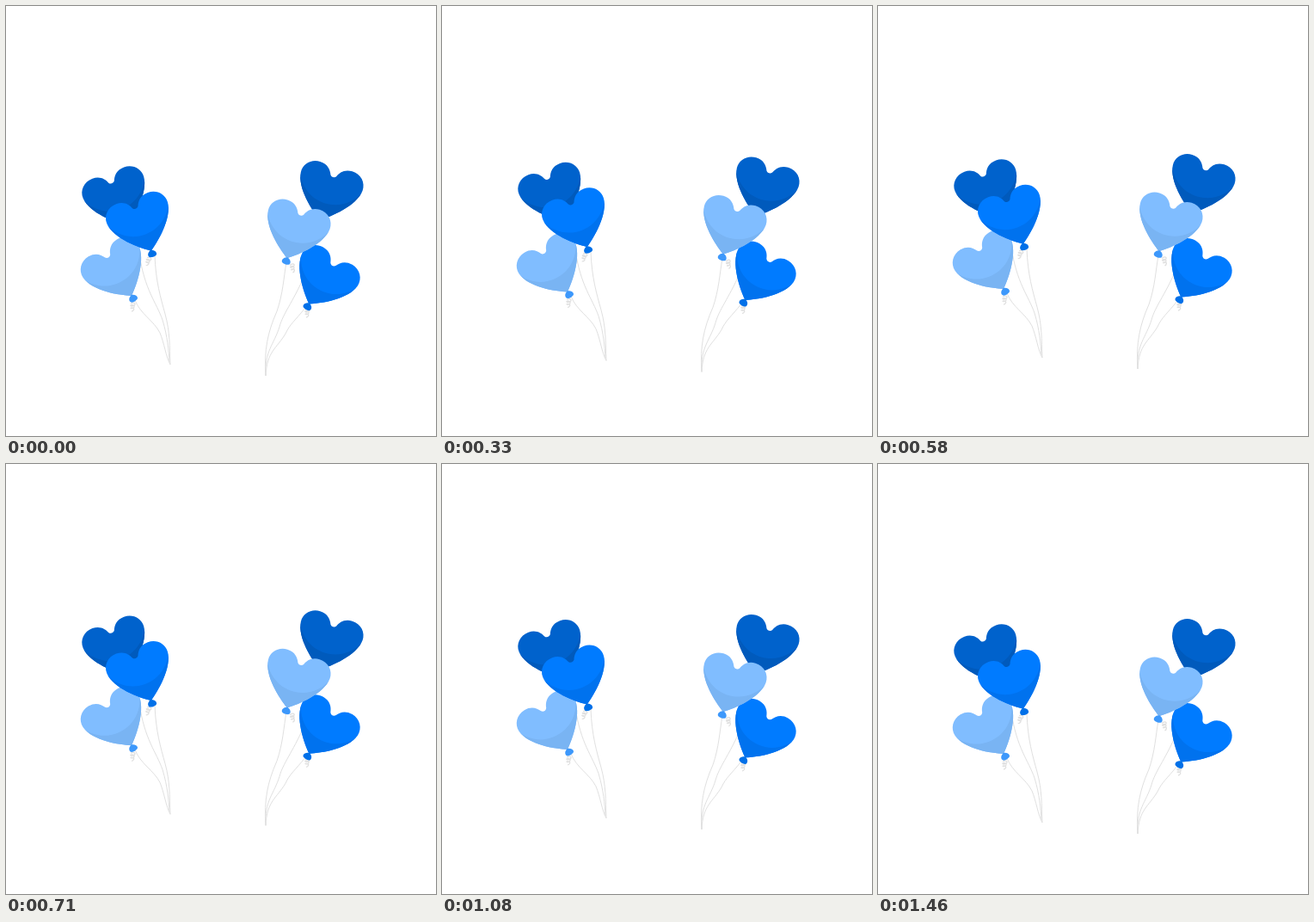
Write an HTML page with a canvas that moves like this. It is 500 px wide and 500 px high and loops after 1.5 s.

```html
<!DOCTYPE html>
<html lang="en">
<head>
<meta charset="utf-8">
<title>Heart balloons</title>
<style>
  html, body { margin: 0; width: 100%; height: 100%; overflow: hidden; background: #fff; }
  canvas { display: block; width: 100vw; height: 100vh; }
</style>
</head>
<body>
<canvas id="stage" width="500" height="500"></canvas>
<script>
const ctx = document.getElementById('stage').getContext('2d');

const LOOP = 1500;
const FPS = 24;
const LAST_STEP = 35;
const RISE = 10;

const DARK = { body: '#0062cc', shade: '#005abc' };
const MID = { body: '#007bff', shade: '#0072ee', knot: '#0070e8' };
const LIGHT = { body: '#80bdff', shade: '#79b4f3', knot: '#3d98fb' };

// Shapes are upright, with the balloon's tip at the origin.
const heart = new Path2D(`M0 0 C12 -8 36 -28 37.5 -47 C38 -57 30 -65 19.5 -65
  C10 -65 5.5 -59 3.5 -54 C2 -51.5 -2 -51.5 -3.5 -54 C-5.5 -59 -10 -65 -19.5 -65
  C-30 -65 -38 -57 -37.5 -47 C-36 -28 -12 -8 0 0 Z`);
const shade = new Path2D('M-39 -48 C-25 -11 25 -11 39 -48 L39 4 L-39 4 Z');
const knot = new Path2D(`M0 -1 C3 0 5.4 2 5 5 C4.4 7.5 1.5 7 0 7.6
  C-1.5 7 -4.4 7.5 -5 5 C-5.4 2 -3 0 0 -1 Z`);
const curl = new Path2D(`M-2 0 C4 -3 5 3 -1 3 C-5 2 3 0 2 4
  C1 7 -4 5 -1 5 C4 5 1 9 -1 9`);

const strings = [
  'M155 288 C161 330 175 345 182 365 C188 385 189 400 190 414',
  'M173 290 C174 320 180 340 185 358 C191 380 190 395 191 417',
  'M150 342 C156 358 172 366 179 380 C184 392 186 408 191 417',
  'M326 298 C323 315 322 335 315 355 C304 380 300 400 302 430',
  'M346 316 C333 345 322 358 318 373 C312 393 300 402 302 430',
  'M348 351 C336 366 330 370 325 381 C315 398 303 402 302 430'
].map(d => new Path2D(d));

const curls = [[166, 293, 15], [147, 346, 0], [332, 301, -15], [350, 353, 0]];

// Back to front; x and y give the tip.
const balloons = [
  { x: 141, y: 255.2, angle: -20, color: DARK },
  { x: 146, y: 337, angle: -31, color: LIGHT },
  { x: 168.7, y: 284.7, angle: -20, color: MID },
  { x: 365, y: 248.8, angle: 17, color: DARK },
  { x: 352.5, y: 346.5, angle: 31, color: MID },
  { x: 327, y: 293.3, angle: 17, color: LIGHT }
];

function placed(x, y, angle, paint) {
  ctx.save();
  ctx.translate(x, y);
  ctx.rotate(angle * Math.PI / 180);
  paint();
  ctx.restore();
}

function fill(path, color) {
  ctx.fillStyle = color;
  ctx.fill(path);
}

function drawBalloon({ x, y, angle, color }) {
  placed(x, y, angle, () => {
    fill(heart, color.body);
    ctx.save();
    ctx.clip(heart);
    fill(shade, color.shade);
    ctx.restore();
    if (color.knot) fill(knot, color.knot);
  });
}

function draw(time) {
  const step = Math.min(LAST_STEP, Math.floor((time % LOOP + 4) * FPS / 1000));
  const lift = RISE * (1 - Math.abs(2 * step / LAST_STEP - 1));

  ctx.fillStyle = '#fff';
  ctx.fillRect(0, 0, 500, 500);
  ctx.save();
  ctx.translate(0, -lift);
  ctx.strokeStyle = '#e0e0e0';
  ctx.lineWidth = 1;
  strings.forEach(path => ctx.stroke(path));
  ctx.lineWidth = 1.3;
  curls.forEach(([x, y, angle]) => placed(x, y, angle, () => ctx.stroke(curl)));
  balloons.forEach(drawBalloon);
  ctx.restore();
}

const start = performance.now();
function tick() {
  draw(performance.now() - start);
  requestAnimationFrame(tick);
}
tick();
</script>
</body>
</html>
```
